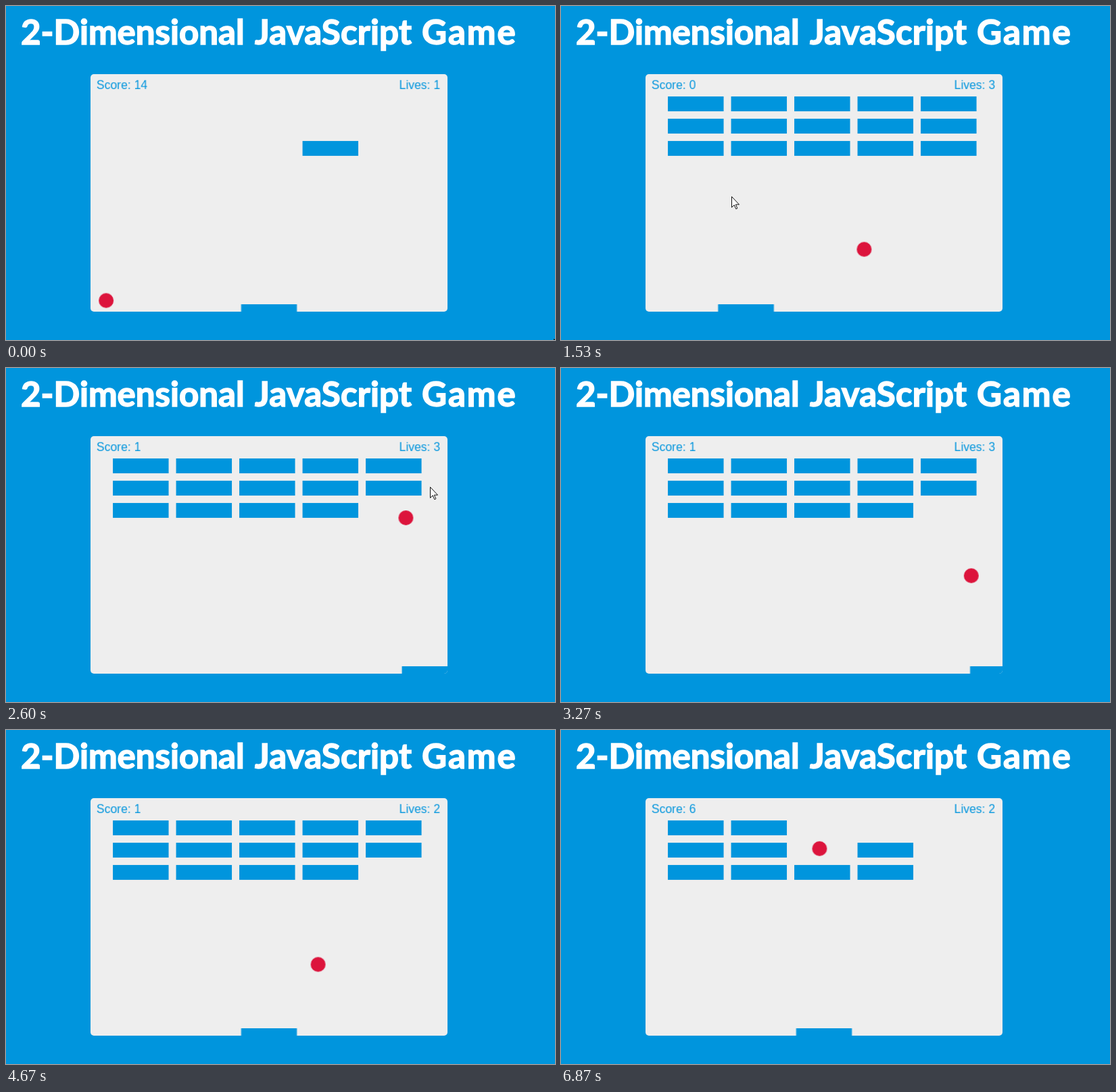
Recreate the animation shown at these times as an HTML page with a canvas. Size 812 by 495 pixels, loop 6.94 s.

```html
<!DOCTYPE html>
<html lang="en">
<head>
<meta charset="utf-8">
<title>2-Dimensional JavaScript Game</title>
<style>
  html, body { margin: 0; width: 100%; height: 100%; overflow: hidden; background: #0095dd; }
  svg, canvas { position: absolute; display: block; }
  svg { left: 0; top: 0; width: 812px; height: 495px; }
  canvas { left: 125px; top: 101px; width: 528px; height: 352px; border-radius: 5px; background: #eee; }
  .title { font: 700 51px Lato, "Open Sans", sans-serif; fill: #fff; stroke: #fff; stroke-width: 1.6px; }
</style>
</head>
<body>
<canvas id="board" width="480" height="320"></canvas>
<svg viewBox="0 0 812 495" xmlns="http://www.w3.org/2000/svg">
  <g class="title">
    <text x="22" y="57">2-Dimensional</text>
    <text x="368" y="57" letter-spacing=".2">JavaScript</text>
    <text x="615" y="57" letter-spacing="2">Game</text>
  </g>
  <path id="cursor" d="M.5.5v16l3.7-3.6 2.6 5.9 2.1-1-2.6-5.6h5.2z" fill="#fff" stroke="#111"/>
</svg>
<script>
const LOOP = 6940, TICK = 200 / 3, LAST_TICK = 103;
const RESTART = 17;               // tick at which a new game begins
const HOME = 202.5, RIGHT = 436.4; // paddle resting places
const BLUE = "#0095dd", RED = "#dc143c";
const cursor = document.getElementById("cursor");
const ctx = document.getElementById("board").getContext("2d");

// Game steps reached at given ticks: about four per tick
const pace = [[RESTART, 3], [39, 92], [59, 170], [LAST_TICK, 346]];

// Pointer strokes: Bezier control points of x, y and paddle centre
const strokes = [
  { from: 0, to: 1, pts: [[810, 493], [785, 403]] },
  { from: 20, to: 42, pts: [[470, 109, 530], [-249, 659, -307], [488, 219, 496], [759, 120, 759]] },
  { from: 61, to: 64, pts: [[792, 65, 792], [135, 320, 135]] }
];

const lerp = (a, b, u) => a + (b - a) * u;

function bezier(pts, u) {
  while (pts.length > 1) {
    pts = pts.slice(1).map((p, i) => p.map((v, j) => lerp(pts[i][j], v, u)));
  }
  return pts[0];
}

function stepAt(k) {
  const i = Math.max(1, pace.findIndex(p => p[0] >= k));
  const [k0, s0] = pace[i - 1], [k1, s1] = pace[i];
  return Math.round(lerp(s0, s1, (k - k0) / (k1 - k0)));
}

const bricks = [];
for (let c = 0; c < 5; c++) {
  for (let r = 0; r < 3; r++) {
    bricks.push({ c, r, x: 30 + c * 85, y: 30 + r * 30, hit: Infinity });
  }
}

// Play the game once; every brick remembers the step that broke it
function play(steps) {
  const log = [];
  let x = 240, y = 290, dx = 2, dy = -2, lives = 3;
  for (let s = 0; s <= steps; s++) {
    log.push({ x, y, lives });
    for (const b of bricks) {
      if (b.hit > s && x > b.x && x < b.x + 75 && y > b.y && y < b.y + 20) {
        b.hit = s;
        dy = -dy;
      }
    }
    if (x + dx > 470 || x + dx < 10) dx = -dx;
    if (y + dy < 10) dy = -dy;
    else if (y + dy > 310) {
      lives--;
      x = 240; y = 290; dx = 3; dy = -3;
    }
    x += dx;
    y += dy;
  }
  return log;
}
const log = play(346);

function drawBoard(k, paddleX) {
  const over = k < RESTART;
  const step = over ? 0 : stepAt(k);
  const { x, y, lives } = over ? { x: 21, y: 305, lives: 1 } : log[step];
  const left = bricks.filter(b => over ? b.c === 3 && b.r === 2 : b.hit >= step);

  ctx.clearRect(0, 0, 480, 320);
  ctx.fillStyle = BLUE;
  for (const b of left) ctx.fillRect(b.x, b.y, 75, 20);
  ctx.fillRect(paddleX, 310, 75, 10);
  ctx.font = '16px "Liberation Sans", Arial, sans-serif';
  ctx.fillText("Score: " + (bricks.length - left.length), 8, 20);
  ctx.fillText("Lives: " + lives, 415, 20);
  ctx.fillStyle = RED;
  ctx.beginPath();
  ctx.arc(x, y, 10, 0, Math.PI * 2);
  ctx.fill();
}

function draw(t) {
  // Ticks start on whole hundredths of a second
  const ms = Math.floor(t / 10) * 10;
  const k = Math.min(LAST_TICK, Math.floor((ms + 3.4) / TICK));
  const stroke = strokes.find(s => k >= s.from && k <= s.to);
  let paddleX = k > 42 && k < 61 ? RIGHT : HOME;

  cursor.style.display = stroke ? "" : "none";
  if (stroke) {
    const { from, to, pts } = stroke;
    const [x, y, centre] = bezier(pts, (k - from) / (to - from));
    cursor.setAttribute("transform", `translate(${Math.round(x)} ${Math.round(y)})`);
    if (centre) paddleX = Math.max(0, Math.min(RIGHT, (centre - 125) / 1.1 - 37.5));
  }
  drawBoard(k, paddleX);
}

const start = performance.now();
function loop() {
  draw((performance.now() - start) % LOOP);
  requestAnimationFrame(loop);
}
loop();
</script>
</body>
</html>
```
